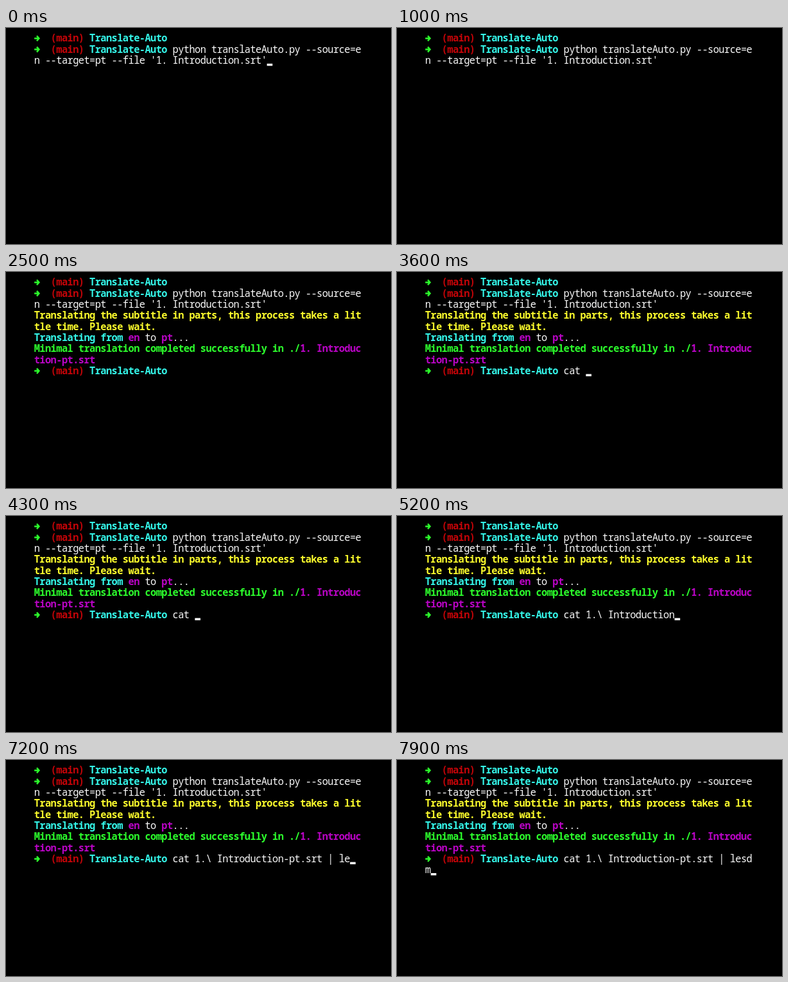
Recreate the animation shown at these times as an HTML page with a canvas. Size 600 by 338 pixels, loop 8000 ms.

```html
<!DOCTYPE html>
<html lang="en">
<head>
<meta charset="utf-8">
<title>Terminal session</title>
<style>
  html, body { margin: 0; width: 100%; height: 100%; overflow: hidden; background: #000; }
  canvas { display: block; width: 600px; height: 338px; }
</style>
</head>
<body>
<canvas id="screen" width="600" height="338"></canvas>
<script>
const LOOP = 8000;
const COLS = 59;
const LEFT = 44, BASE = 21.3, ROW = 17.32, CELL = 8.635, SIZE = 15.4;

const WHITE = '#fafafa', CYAN = '#34f5e8', GREEN = '#2cff2c', ARROW = '#2cff2c';
const RED = '#c40408', YELLOW = '#fbfb2c', MAGENTA = '#b904c4';

const canvas = document.getElementById('screen');
const ctx = canvas.getContext('2d');
const scale = Math.max(1, window.devicePixelRatio || 1);
canvas.width = 600 * scale;
canvas.height = 338 * scale;

const bold = (color, text) => ({ color, text, weight: 700 });
const plain = text => ({ color: WHITE, text, weight: 500 });
const prompt = [bold(ARROW, '➜'), plain('  '), bold(RED, '(main)'), plain(' '), bold(CYAN, 'Translate-Auto'), plain(' ')];

const started = [
  [0, prompt],
  [1, [...prompt, plain("python translateAuto.py --source=en --target=pt --file '1. Introduction.srt'")]]
];
const progress = [
  [3, [bold(YELLOW, 'Translating the subtitle in parts, this process takes a little time. Please wait.')]],
  [5, [bold(CYAN, 'Translating from '), bold(MAGENTA, 'en'), plain(' to '), bold(MAGENTA, 'pt'), plain('...')]]
];
const done = [6, [bold(GREEN, 'Minimal translation completed successfully in ./'), bold(MAGENTA, '1. Introduction-pt.srt')]];

// What the last prompt holds from each moment on; tab completion adds several letters at once.
const typed = [
  [2150, ''], [2900, 'c'], [3200, 'ca'], [3400, 'cat'], [3600, 'cat '],
  [4700, 'cat 1'], [4950, 'cat 1.\\ Introduction'],
  [5900, 'cat 1.\\ Introduction-'], [6100, 'cat 1.\\ Introduction-pt.srt ']
];
const tail = '| lesdm';
const tailTimes = [6600, 6800, 7000, 7200, 7350, 7550, 7750];

function commandAt(t) {
  let text = '';
  for (const [time, value] of typed) if (t >= time) text = value;
  return text + tail.slice(0, tailTimes.filter(time => t >= time).length);
}

// Cursor is off in these spans.
const hidden = [[700, 1100], [1300, 2150], [2400, 2750]];

function drawArrow(x, y) {
  ctx.lineWidth = 2.5;
  ctx.strokeStyle = ARROW;
  ctx.beginPath();
  ctx.moveTo(x + 0.2, y);
  ctx.lineTo(x + 7, y);
  ctx.moveTo(x + 4, y - 4);
  ctx.lineTo(x + 7.4, y);
  ctx.lineTo(x + 4, y + 4);
  ctx.stroke();
}

function drawRun(text, col, row, run) {
  const x = LEFT + col * CELL, y = BASE + row * ROW;
  if (text === '➜') return drawArrow(x, y - 5);
  ctx.font = `${run.weight} ${SIZE}px "Noto Sans Mono", monospace`;
  ctx.fillStyle = run.color;
  // Each letter is centred in its own terminal cell.
  [...text].forEach((letter, i) => ctx.fillText(letter, x + (i + 0.5) * CELL, y));
}

// Writes the runs, wrapping at the right edge, and returns the next free cell.
function writeLine(row, runs) {
  let pos = 0;
  for (const run of runs) {
    let rest = run.text;
    while (rest) {
      const col = pos % COLS;
      const part = rest.slice(0, COLS - col);
      drawRun(part, col, row + Math.floor(pos / COLS), run);
      pos += part.length;
      rest = rest.slice(part.length);
    }
  }
  return { col: pos % COLS, row: row + Math.floor(pos / COLS) };
}

function draw(t) {
  ctx.setTransform(scale, 0, 0, scale, 0, 0);
  ctx.textAlign = 'center';
  ctx.fillStyle = '#000';
  ctx.fillRect(0, 0, 600, 338);

  let cursor;
  for (const [row, runs] of started) cursor = writeLine(row, runs);
  if (t >= 100) cursor = { col: 0, row: 3 };
  if (t >= 1300) for (const [row, runs] of progress) writeLine(row, runs);
  if (t >= 2150) {
    writeLine(...done);
    cursor = writeLine(8, [...prompt, plain(commandAt(t))]);
  }

  if (!hidden.some(([from, to]) => t >= from && t < to)) {
    ctx.fillStyle = WHITE;
    ctx.fillRect(LEFT + cursor.col * CELL, BASE + cursor.row * ROW - 0.2, CELL, 3.5);
  }
}

const start = performance.now();
function tick() {
  draw((performance.now() - start) % LOOP);
  requestAnimationFrame(tick);
}
tick();
</script>
</body>
</html>
```
